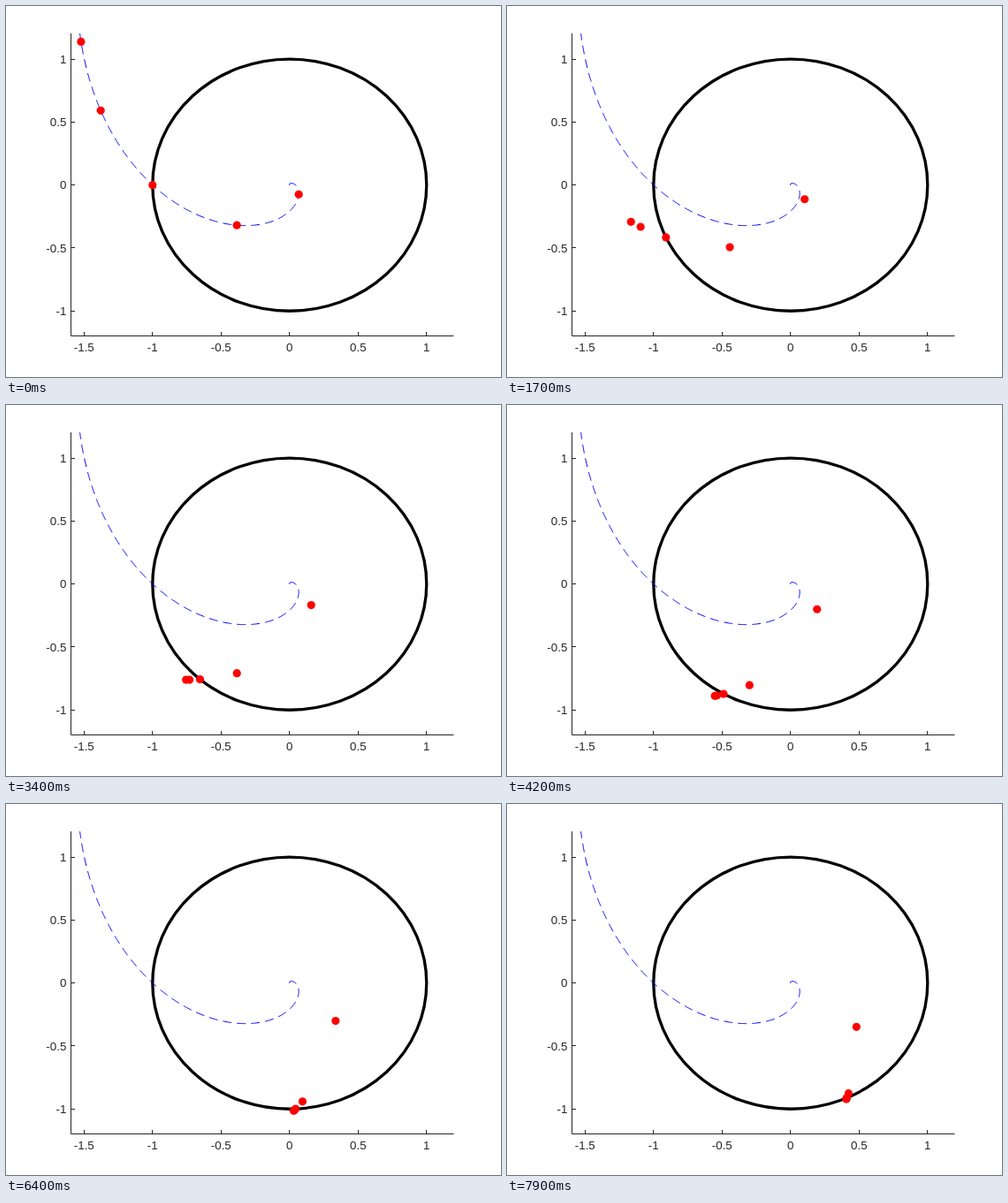
Recreate the animation shown at these times as an HTML page. Size 560 by 420 pixels, loop 8000 ms.

```html
<!DOCTYPE html>
<html lang="en">
<head>
<meta charset="utf-8">
<title>Limit cycle and isochron</title>
<style>
  html, body { margin: 0; width: 100%; height: 100%; overflow: hidden; background: #fff; }
  svg { display: block; }
  text { font: 13.33px "Liberation Sans", Arial, sans-serif; fill: #262626; }
  .axes { fill: none; stroke: #262626; stroke-width: 1; }
  .cycle { fill: none; stroke: #000; stroke-width: 3.3; }
  .isochron { fill: none; stroke: #00f; stroke-width: 1; stroke-dasharray: 10 6; }
  .dots { fill: #f00; }
</style>
</head>
<body>
<svg width="560" height="420" viewBox="0 0 560 420">
  <clipPath id="plot"><rect x="73" y="31" width="434" height="343"/></clipPath>
  <path class="axes"/>
  <g class="labels"></g>
  <ellipse class="cycle" cx="320.8" cy="202.65" rx="155" ry="142.6"/>
  <path class="isochron" clip-path="url(#plot)"/>
  <g class="dots"></g>
</svg>
<script>
const $ = s => document.querySelector(s);
const px = x => 320.8 + 155 * x;
const py = y => 202.65 - 142.6 * y;
const snap = v => Math.floor(v) + 0.5;

function add(parent, tag, attrs) {
  const el = document.createElementNS("http://www.w3.org/2000/svg", tag);
  for (const k in attrs) el.setAttribute(k, attrs[k]);
  return parent.appendChild(el);
}

// All points with the same phase lie on one logarithmic spiral.
function spiral(r, phase) {
  const a = phase - Math.log(r);
  return [px(r * Math.cos(a)), py(r * Math.sin(a))];
}

function drawAxes() {
  const labels = $(".labels");
  let d = "M73.5 31V373.5H506.5";
  for (let v = -1.5; v <= 1; v += 0.5) {
    d += `M${snap(px(v))} 373.5v-4.5`;
    add(labels, "text", { x: px(v), y: 391, "text-anchor": "middle" }).textContent = v;
    if (v < -1) continue;
    d += `M73.5 ${snap(py(v))}h4.5`;
    add(labels, "text", { x: 68.3, y: py(v) + 4.6, "text-anchor": "end" }).textContent = v;
  }
  $(".axes").setAttribute("d", d);
}

function drawIsochron() {
  const points = [];
  for (let r = 0.001; r <= 2; r += 0.005) {
    points.push(spiral(r, Math.PI).map(n => n.toFixed(2)).join(" "));
  }
  $(".isochron").setAttribute("d", "M" + points.join("L"));
}

const radii = [1.9, 1.5, 1, 0.5, 0.1];
const dots = radii.map(() => add($(".dots"), "circle", { r: 4.6 }));
const STEP = 2 * Math.PI / 249;

// Exact solution of r' = r(1 - r²), θ' = r².
const radiusAt = (r0, t) => 1 / Math.sqrt(1 + (1 / (r0 * r0) - 1) * Math.exp(-2 * t));

function frame(now) {
  const t = Math.floor(now % 8000 / 100) * STEP;
  dots.forEach((dot, i) => {
    const [x, y] = spiral(radiusAt(radii[i], t), Math.PI + t);
    dot.setAttribute("cx", x);
    dot.setAttribute("cy", y);
  });
  requestAnimationFrame(frame);
}

drawAxes();
drawIsochron();
frame(performance.now());
</script>
</body>
</html>
```
